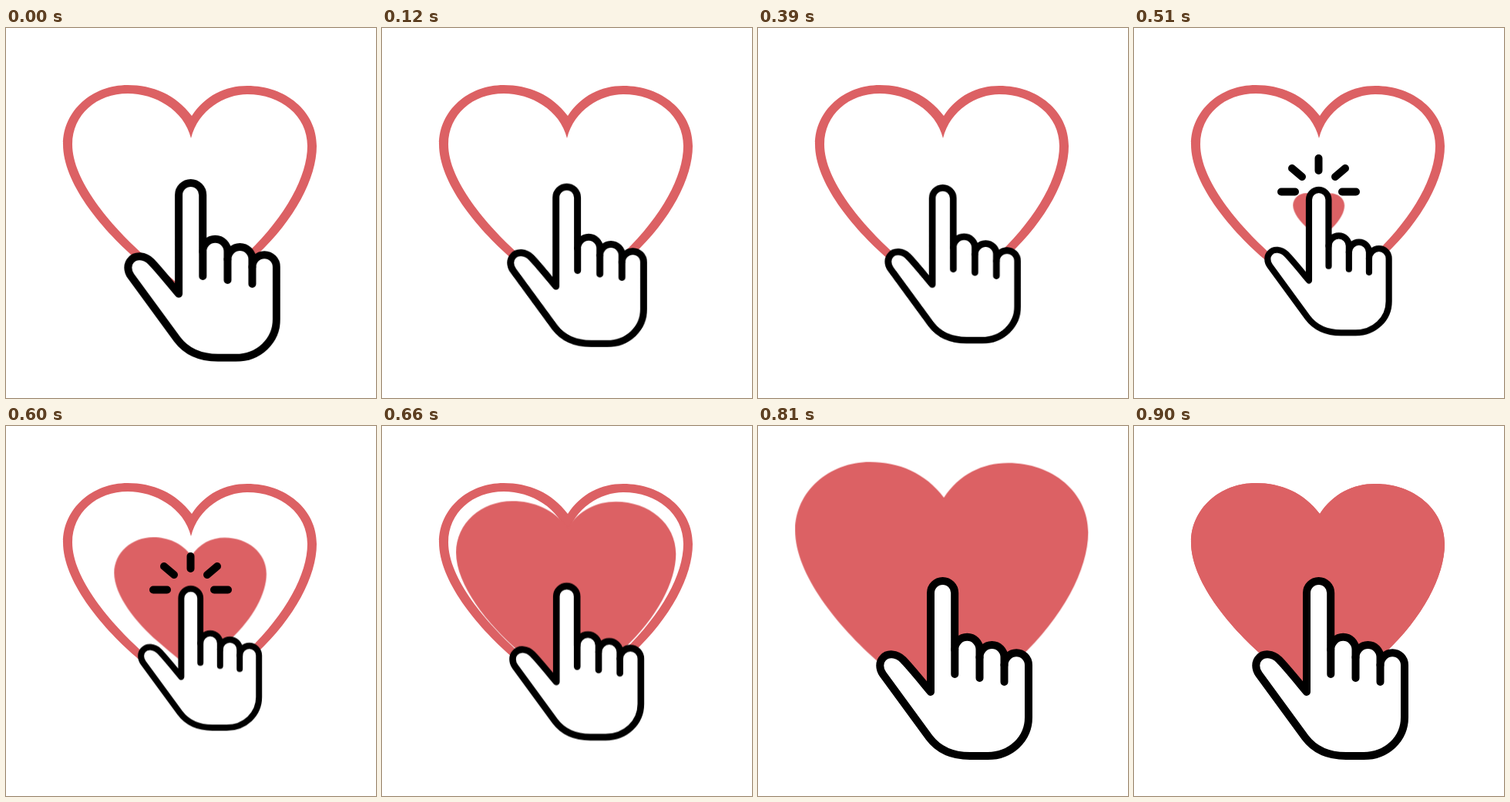
These frames come from a looping animation (480x480 px, 1.5 s). An HTML page without scripts:

```html
<!DOCTYPE html>
<html lang="en">
<head>
<meta charset="utf-8">
<title>Tap the heart</title>
<style>
  html, body { margin: 0; width: 100%; height: 100%; overflow: hidden; background: #fff; }
  svg { display: block; width: 100%; height: 100%; }

  .red { fill: #dc6164; }
  .ink { stroke: #000; stroke-width: 10; stroke-linecap: round; stroke-linejoin: round; }
  .heart, .hand { transform-origin: 240px 250px; }
  .heart { animation: pop 1.5s linear infinite; }
  .hand { animation: tap 1.5s linear infinite; }
  .rays { animation: flash 1.5s step-end infinite; }

  @keyframes tap {
    0% { transform: scale(1); }
    8% { transform: scale(.897); }
    18%, 36%, 40% { transform: scale(.793); }
    28% { transform: scale(.89); }
    50% { transform: scale(.965); }
    53%, 100% { transform: scale(1); }
  }
  @keyframes pop {
    0%, 31% { transform: scale(0); }
    40% { transform: scale(.596); }
    50% { transform: scale(1.262); }
    60%, 100% { transform: scale(1); }
  }
  @keyframes flash {
    0%, 44% { visibility: hidden; }
    34% { visibility: visible; }
    100% { visibility: hidden; }
  }
</style>
</head>
<body>
<svg viewBox="0 0 480 480">
  <defs>
    <path id="shape" d="M241 114C220 86 190 74 158 74C112 74 74 107 74 151C74 200 122 259 168 299C200 327 225 346 240 362C262 342 297 320 326 294C374 249 403 195 403 153C403 108 363 75 313 75C284 75 258 88 241 114Z"/>
  </defs>

  <use href="#shape" class="red"/>
  <path fill="#fff" d="M240 143C231 106 193 85 158 85C118 85 86 112 86 151C86 198 136 256 177 293L240 346L314 291C363 244 391 192 391 153C391 114 357 86 313 86C284 86 249 106 240 143Z"/>

  <use href="#shape" class="red heart"/>

  <path class="ink rays" fill="none" d="M239.500 169V185M191 212.500H209M270 212.500H288M205 182L218 193M274 182L261 193"/>

  <g class="hand ink" fill="#fff">
    <path d="M224 345V216.500A15.600 15.600 0 0 1 255.200 216.500V290A16 16 0 0 1 287.500 290V300A16 16 0 0 1 319.500 300V310A15.750 15.750 0 0 1 351 310V378C351 406 328 428 298 428H275C252 428 234 420 222 404L162 322C157 315 157 306 162 301C168 294 180 295 188 303C196 311 209 327 224 345Z"/>
    <path fill="none" d="M255.300 290V322M287.500 300V327M319.500 310V332"/>
  </g>
</svg>
</body>
</html>
```
